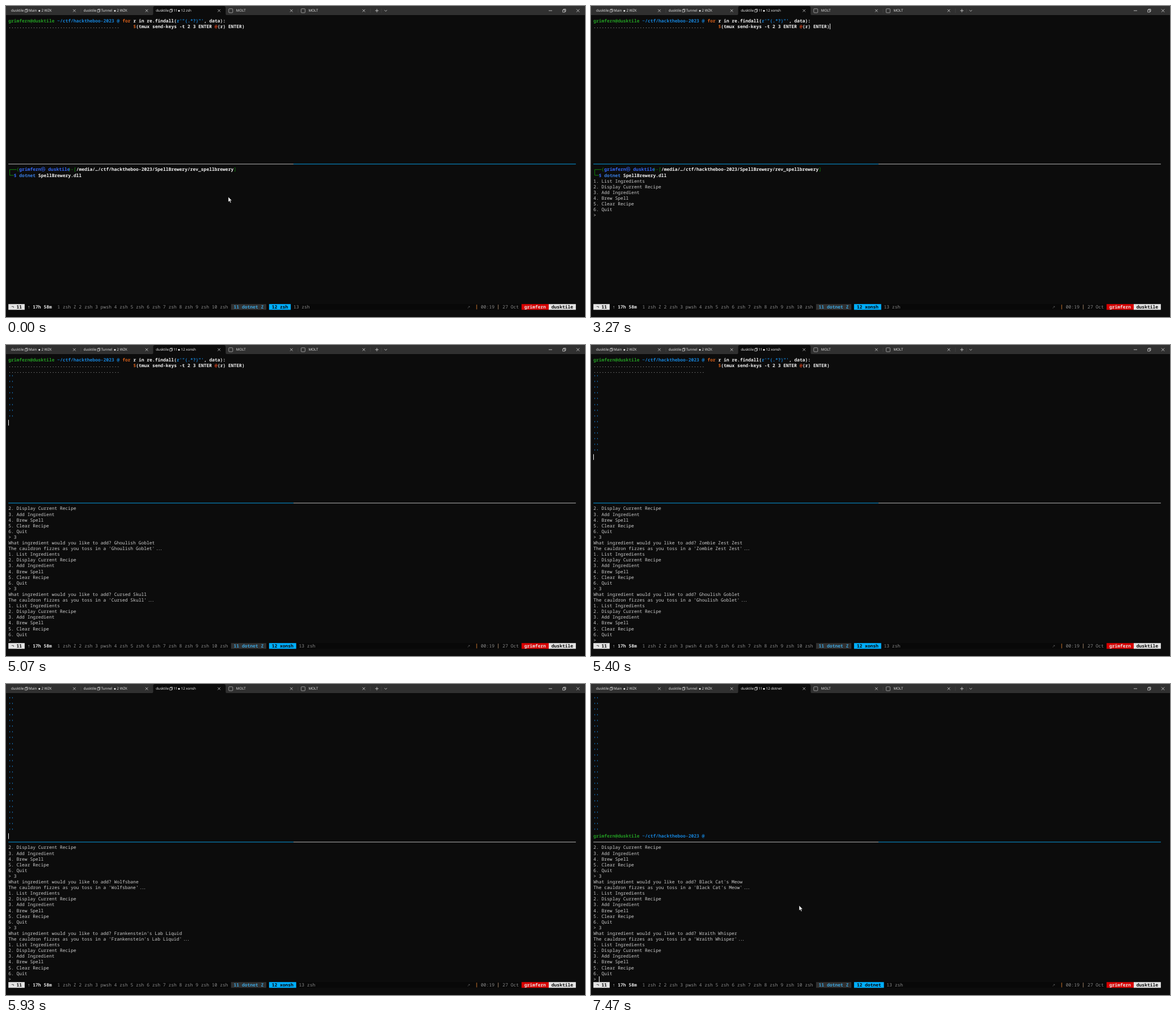
Animation of 1021 by 549 pixels, one loop 8 s. Source, as an HTML page:

```html
<!DOCTYPE html>
<html lang="en">
<head>
<meta charset="utf-8">
<title>Terminal session</title>
<style>
html, body { margin: 0; width: 100%; height: 100%; overflow: hidden; background: #0c0c0c; }
svg { display: block; width: 100%; height: 100%; }
text { white-space: pre; text-rendering: geometricPrecision; }
.m { font: 500 7.98px "Noto Sans Mono", "Noto Sans CJK KR", "Noto Sans CJK JP", "DejaVu Sans Mono", monospace; font-variant-ligatures: none; }
.b { font-weight: 700; }
.dots { letter-spacing: -1.4px; }
.ui { font: 400 6.2px "Open Sans", "Noto Sans", sans-serif; }
.line { fill: none; stroke-width: .7; }
</style>
</head>
<body>
<svg id="stage" viewBox="0 0 1021 549" xmlns="http://www.w3.org/2000/svg">
  <g id="window"></g>
  <g id="screen"></g>
  <path id="mouse" d="M0 0V9L2.1 7.1 3.6 10.4 5 9.8 3.5 6.6H6.3Z" fill="#fff" stroke="#111" stroke-width=".5"/>
</svg>
<script>
const LOOP = 8000, TICK = 1000 / 15;
const X0 = 4.2, Y0 = 21, CW = 4.788, RH = 10.104;
const USER = "grimfern", HOST = "dusktile", TEAM = "WZK", GAME = "MOLT";
const C = {
  text: "#cccccc", white: "#f2f2f2", green: "#239b23", blue: "#1683d8", orange: "#d9601a",
  frame: "#13a10e", shell: "#3468f5", command: "#3a80e6", grey: "#8a8a8a", dark: "#080808",
  active: "#00afff", border: "#b8b8b8", pale: "#e4e4e4"
};

const $ = id => document.getElementById(id);
const colX = c => X0 + c * CW;
const rowY = r => Y0 + r * RH;
const esc = s => s.replace(/&/g, "&amp;").replace(/</g, "&lt;");
const rect = (x, y, w, h, fill, extra = "") =>
  `<rect x="${x}" y="${y}" width="${w}" height="${h}" fill="${fill}" ${extra}/>`;
const stroke = (d, color, width = .7) =>
  `<path class="line" d="${d}" stroke="${color}" style="stroke-width:${width}"/>`;
const label = (x, s, fill) => `<text class="ui" x="${x}" y="10.4" fill="${fill}">${esc(s)}</text>`;

function run(row, col, s, fill, cls = "") {
  const dx = cls === "dots" ? 1.55 : 0;
  return `<text class="m ${cls}" x="${colX(col) + dx}" y="${rowY(row) + 7.7}" fill="${fill}" xml:space="preserve">${esc(s)}</text>`;
}

// A line is a list of [text, colour, class] runs laid end to end.
function drawLine(line, row) {
  let col = 0, out = "";
  for (const [s, fill, cls] of line) {
    out += run(row, col, s, fill, cls);
    col += s.length;
  }
  return out;
}
const cells = (col, n, fill) => rect(colX(col), rowY(50), n * CW, RH, fill);
const caret = (row, col) => rect(Math.round(colX(col)), rowY(row), 1, RH, "#f2f2f2");

const plain = s => [[s, C.text]];
const dots = [".".repeat(41), C.text];
const prompt = [[USER + "@" + HOST, C.green, "b"], [" ~/ctf/hacktheboo-2023 @ ", C.blue, "b"]];
const loopCode = [
  [...prompt, ["for ", C.orange, "b"], ["r in re.findall(", C.white, "b"],
    ["r'\"(.*?)\"'", C.blue, "b"], [", data):", C.white, "b"]],
  [dots, ["     ", C.text], ["$", C.orange, "b"], ["(tmux send-keys -t 2 3 ENTER ", C.white, "b"],
    ["@", "#d9401a", "b"], ["(r) ENTER)", C.white, "b"]]
];
const shellLines = [
  [["   (", C.frame], [USER + "㉿ " + HOST, C.shell, "b"], [")-[", C.frame],
    ["/media/…/ctf/hacktheboo-2023/SpellBrewery/rev_spellbrewery", C.white, "b"], ["]", C.frame]],
  [["  $ ", C.shell, "b"], ["dotnet ", C.command, "b"], ["SpellBrewery.dll", C.white, "b"]]
];
const menu = ["List Ingredients", "Display Current Recipe", "Add Ingredient",
  "Brew Spell", "Clear Recipe", "Quit"].map((s, i) => plain(`${i + 1}. ${s}`));

const recipe = `Phantom Firefly Wing,Ghastly Gourd,Hocus Pocus Powder,Spider Sling Silk,Goblin's Gold,Wraith's Tear,
Werewolf Whisker,Ghoulish Goblet,Cursed Skull,Dragon's Scale Shimmer,Raven Feather,Dragon's Scale Shimmer,
Zombie Zest Zest,Ghoulish Goblet,Werewolf Whisker,Cursed Skull,Dragon's Scale Shimmer,Haunted Hay Bale,
Wraith's Tear,Zombie Zest Zest,Serpent Scale,Wraith's Tear,Cursed Crypt Key,Dragon's Scale Shimmer,
Salamander's Tail,Raven Feather,Wolfsbane,Frankenstein's Lab Liquid,Zombie Zest Zest,Cursed Skull,
Ghoulish Goblet,Dragon's Scale Shimmer,Cursed Crypt Key,Wraith's Tear,Black Cat's Meow,Wraith Whisper`
  .split(",").map(s => s.trim());

// [tick, ingredients added], linear in between
const pace = [[70, 0], [76, 9], [81, 14], [89, 28], [94, 36]];
const tickAt = t => Math.floor((t + 3.4) / TICK);

function addedAt(tick) {
  if (tick <= pace[0][0]) return 0;
  for (let i = 1; i < pace.length; i++) {
    const [a, from] = pace[i - 1], [b, to] = pace[i];
    if (tick <= b) return Math.floor(from + (to - from) * (tick - a) / (b - a) + 1e-6);
  }
  return recipe.length;
}

function stateAt(t) {
  const tick = tickAt(t), added = addedAt(tick);
  return {
    added,
    quotes: tick > 70 && tick < 81 ? Math.max(0, added - 1) : added,
    bar: t >= 930,
    entered: t >= 1930,
    menu: t >= 2000,
    top: t >= 3070 && t < 7400,
    cmd: t < 3270 ? "zsh" : t < 7470 ? "xonsh" : "dotnet",
    third: t >= 3530,
    running: t >= 4670,
    done: t >= 6470
  };
}

function topPane(s) {
  const lines = [...loopCode];
  let col = 87;
  if (s.third) { lines.push([dots]); col = 46; }
  if (s.running) {
    for (let i = 0; i < s.quotes; i++) lines.push([["''", C.blue, "b"]]);
    lines.push(s.done ? prompt : []);
    col = s.done ? 42 : 0;
  }
  const view = lines.slice(-25);
  return view.map(drawLine).join("") + (s.top ? caret(view.length - 1, col) : "");
}

function bottomPane(s) {
  const lines = [...shellLines];
  let col = 27;
  if (s.menu) {
    lines.push(...menu);
    for (const name of recipe.slice(0, s.added)) {
      lines.push(plain("> 3"), plain("What ingredient would you like to add? " + name),
        [[`The cauldron fizzes as you toss in a '${name}'`, C.text], ["...", C.text, "dots"]], ...menu);
    }
    lines.push(plain("> "));
    col = 2;
  } else if (s.entered) {
    lines.push([]);
    col = 0;
  }
  const view = lines.slice(-24);
  let out = view.map((line, i) => drawLine(line, 26 + i)).join("");
  if (lines.length <= 24) {
    const x = colX(.5), y1 = rowY(26.5), y2 = rowY(27.5);
    out += stroke(`M${colX(3)} ${y1}H${x}V${y2}H${colX(2)}`, C.frame, .8);
  }
  if (s.bar && !s.top) out += caret(25 + view.length, col);
  return out;
}

function divider(top) {
  const mid = colX(105), end = colX(209);
  const [left, right] = top ? ["#079ce3", C.border] : [C.border, "#079ce3"];
  return rect(X0, 278.5, mid - X0, 1, left) + rect(mid, 278.5, end - mid, 1, right);
}

function statusBar(cmd) {
  const put = (col, s, fill, cls) => run(50, col, s, fill, cls);
  const current = "12 " + cmd, after = 99 + current.length;
  return cells(0, 209, C.dark) +
    cells(0, 6, C.pale) + stroke("M9.8 530.4H13.2V533", "#222") + put(3, "11", C.dark, "b") +
    put(7, "↑ 17h 58m", C.pale, "b") +
    put(18, "1 zsh Z 2 zsh 3 pwsh 4 zsh 5 zsh 6 zsh 7 zsh 8 zsh 9 zsh 10 zsh", C.grey) +
    cells(82, 13, "#303030") + put(83, "11 dotnet Z", "#3ba3dc", "b") +
    cells(96, current.length + 2, C.active) + put(97, current, C.dark, "b") +
    put(after, "13 zsh", C.grey) +
    stroke("M814 533.6L817.4 530.3M815.6 530.3H817.4V532", "#707070", .6) +
    stroke("M830 527.2V535.5", "#c8742d", 1) + put(174, "00:19", C.grey) +
    stroke("M868 527.2V535.5", "#a08468", 1) + put(182, "27 Oct", C.grey) +
    cells(189, 10, "#d70000") + put(190, USER, C.pale, "b") +
    cells(199, 10, C.pale) + put(200, HOST, C.dark, "b");
}

const cross = x => stroke(`M${x - 2.3} 5.9l4.6 4.6m0 -4.6l-4.6 4.6`, "#e6e6e6");

function sessionTab(x, name, dotX, rest, fill) {
  return label(x, HOST, fill) +
    stroke(`M${x + 24.4} 6.6h3.6v4.2h-3.6zM${x + 25.6} 6.6v-1.1h3.6v4.2h-1.2`, fill, .6) +
    label(x + 31, name, fill) +
    `<circle cx="${dotX}" cy="8.4" r="1.5" fill="${fill}"/>` + label(dotX + 3.6, rest, fill);
}

function gameTab(x) {
  return `<rect x="${x}" y="4.9" width="7" height="7" rx="1" fill="none" stroke="#b0b0b0" stroke-width=".8"/>` +
    label(x + 13, GAME, "#ececec");
}

function drawWindow() {
  const fill = "#ececec";
  let out = rect(0, 0, 1021, 549, "#0c0c0c") + rect(0, 0, 1021, 16, "#303030") +
    `<path d="M257.5 16Q259.5 16 259.5 14V4Q259.5 0 263 0H384Q387.3 0 387.3 4V14Q387.3 16 389.3 16Z" fill="#0c0c0c"/>`;
  out += sessionTab(9, "Main", 58.8, "2 " + TEAM, fill);
  out += sessionTab(136.7, "Tunnel", 192, "2 " + TEAM, fill);
  out += gameTab(392.8) + gameTab(520.4);
  for (let i = 0; i < 5; i++) out += cross(120.5 + i * 127.6);
  for (const x of [132, 515, 642.6, 662]) out += stroke(`M${x} 4.5V12`, "#484848", .6);
  out += stroke("M651 8.2h6M654 5.2v6M667.4 7.2l2.2 2.2 2.2 -2.2M957 8.2h6", fill);
  out += stroke("M981.7 6.9h4v4h-4zM983 6.9V5.6h4v4h-1.3", fill);
  return out + stroke("M1006 5.6l5.2 5.2m0 -5.2l-5.2 5.2", fill);
}

function mouseAt(t) {
  if (t < 1930) return [392, 337];
  if (t < 6930) return null;
  const p = Math.min(1, (tickAt(t) - 104) / 3), e = p * (2 - p);
  return [389 - 22 * e, 351 + 40 * e];
}

let lastKey = "";
function render(t) {
  const s = stateAt(t), key = JSON.stringify(s);
  if (key !== lastKey) {
    lastKey = key;
    $("screen").innerHTML = sessionTab(264.3, "11", 305, "12 " + s.cmd, "#fff") +
      topPane(s) + divider(s.top) + bottomPane(s) + statusBar(s.cmd);
  }
  const at = mouseAt(t);
  $("mouse").style.display = at ? "" : "none";
  if (at) $("mouse").setAttribute("transform", `translate(${at})`);
}

$("window").innerHTML = drawWindow();
const start = performance.now();
function frame() {
  render((performance.now() - start) % LOOP);
  requestAnimationFrame(frame);
}
frame();
</script>
</body>
</html>
```
